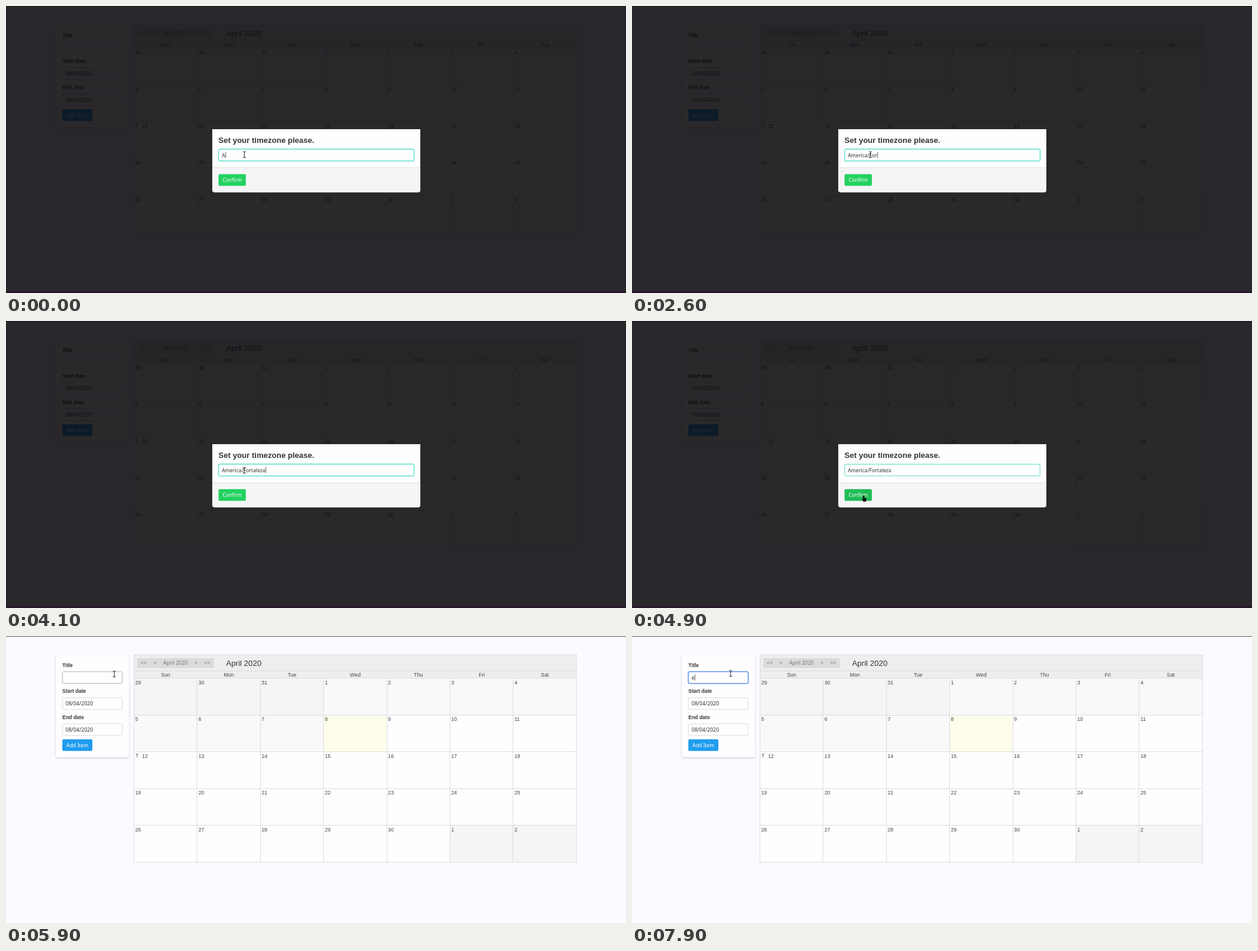
Animation of 1034 by 480 pixels, one loop 8000 ms. Source, as an HTML page with a canvas:

```html
<!DOCTYPE html>
<html lang="en">
<head>
<meta charset="utf-8">
<title>Calendar with timezone prompt</title>
<style>
html, body { margin: 0; width: 100%; height: 100%; overflow: hidden; background: #f9fbff; }
canvas { display: block; }
</style>
</head>
<body>
<canvas id="stage" width="1034" height="480"></canvas>
<script>
const ctx = document.getElementById('stage').getContext('2d');
const LOOP = 8000;
const SANS = '"Liberation Sans", Arial, sans-serif';
const UI = '"Noto Sans", "Open Sans", sans-serif';
const INK = '#363636';

const zone = 'America/Fortaleza';
const keyTimes = [0, 300, 500, 600, 800, 900, 1000, 1800, 2200, 2400, 2600,
  2800, 2900, 3100, 3200, 3500, 3700];
const CLICK = 4800, CLOSE = 5000, FOCUS = 6600, TITLE_KEY = 7800;

// time, x, y
const mousePath = [
  [0, 397.5, 248.5], [4000, 397.5, 248.5], [4100, 397.5, 249.5], [4200, 396, 259],
  [4400, 388, 287], [4500, 384.5, 293], [5000, 384.3, 292.7], [5100, 383, 291],
  [5400, 366, 270], [5600, 334, 230], [5700, 285, 170], [5800, 218, 82],
  [5900, 180.5, 63.5], [6100, 171, 61], [6400, 164.5, 62.5], [LOOP, 164.5, 62.5]
];

function mouseAt(t) {
  const i = mousePath.findIndex(p => p[0] > t);
  const [t0, x0, y0] = mousePath[i - 1], [t1, x1, y1] = mousePath[i];
  const k = (t - t0) / (t1 - t0);
  return { x: x0 + (x1 - x0) * k, y: y0 + (y1 - y0) * k };
}

const inside = (m, x, y, w, h) => m.x >= x && m.x <= x + w && m.y >= y && m.y <= y + h;
const caretOn = age => age % 1200 < 600;

function box(x, y, w, h, fill, radius = 0, stroke, lineWidth = 1) {
  ctx.beginPath();
  ctx.roundRect(x, y, w, h, radius);
  if (fill) { ctx.fillStyle = fill; ctx.fill(); }
  if (stroke) { ctx.strokeStyle = stroke; ctx.lineWidth = lineWidth; ctx.stroke(); }
}

// y is the middle of the capitals; returns the text width
function text(str, x, y, font = SANS, size = 8.67, color = INK, align = 'left', weight = 400) {
  ctx.font = `${weight} ${size}px ${font}`;
  ctx.fillStyle = color;
  ctx.textAlign = align;
  ctx.fillText(str, x, y + size * 0.36);
  return ctx.measureText(str).width;
}

function field(x, y, w, value, border, ring, caret, size = 8.67) {
  if (ring) box(x, y, w, 19.5, null, 2.5, ring, 2.6);
  box(x, y, w, 19.5, '#fffeff', 2.5, border);
  const width = text(value, x + 5.2, y + 10, UI, size);
  if (caret) box(x + 5.7 + width, y + 4.7, 0.8, 10, INK);
}

function button(x, y, w, label, color) {
  box(x, y, w, 19.5, color, 2);
  text(label, x + w / 2, y + 10, UI, 8.43, '#fff', 'center');
}

function drawForm(t, mouse) {
  ctx.save();
  ctx.shadowColor = 'rgba(10,10,10,.22)';
  ctx.shadowBlur = 3;
  ctx.shadowOffsetY = 1;
  box(83, 31.5, 122, 171.5, '#fffdff', 4);
  ctx.restore();
  ['Title', 'Start date', 'End date'].forEach((label, i) =>
    text(label, 94, 48.5 + 43.5 * i, SANS, 8.5, INK, 'left', 700));

  const focused = t >= FOCUS;
  const typed = t >= TITLE_KEY;
  const hover = t > CLOSE && inside(mouse, 94, 59, 100, 21);
  field(94, 59.8, 99.8, typed ? 'e' : '', focused ? '#3273dc' : hover ? '#b0acac' : '#dbd9dc',
    focused && 'rgba(50,115,220,.3)', focused && caretOn(t - (typed ? TITLE_KEY : FOCUS)));
  for (const y of [103.3, 146.8]) field(94, y, 99.8, '08/04/2020', '#dbd9dc');
  button(94, 172.7, 50, 'Add Item', '#209cee');
}

function drawCalendar() {
  const left = 213.5, top = 71, cw = 105.4, rh = 61.5;
  box(left, 31.5, cw * 7, 39.5, '#eeedef');
  box(219, 37, 127.5, 16.5, '#dcdadc');
  [['<<', 229.5], ['<', 248.5], ['April 2020', 282.5], ['>', 317], ['>>', 335.5]].forEach(([s, x]) =>
    text(s, x, 45, UI, 8.6, '#757475', 'center'));
  text('April 2020', 367, 45, SANS, 13.1);
  ['Sun', 'Mon', 'Tue', 'Wed', 'Thu', 'Fri', 'Sat'].forEach((day, i) =>
    text(day, left + cw * (i + 0.5), 64.5, SANS, 8.67, '#454446', 'center'));

  for (let i = 0; i < 35; i++) {
    const day = i - 2;
    const x = left + cw * (i % 7), y = top + rh * Math.floor(i / 7);
    const color = day < 1 || day > 30 ? '#f6f5f5' : day < 8 ? '#f9f9fb' : day === 8 ? '#fefdec' : '#fffdff';
    box(x, y, cw, rh, color);
    const label = day < 1 ? 31 + day : day > 30 ? day - 30 : day;
    if (day === 12) text('†', x + 3, y + 6.2, UI, 8.67);
    text(label, x + (day === 12 ? 13.4 : 2), y + 6.5, SANS, 8.67, '#454446');
  }

  ctx.fillStyle = '#dddcde';
  for (let c = 0; c <= 7; c++) {
    const y = c % 7 ? top : 31;
    ctx.fillRect(Math.floor(left + cw * c), y, 1, 379 - y);
  }
  for (const y of [31, 58]) ctx.fillRect(213, y, 739, 1);
  for (let r = 0; r <= 5; r++) ctx.fillRect(213, Math.floor(top + rh * r - 0.5), 739, 1);
}

function drawModal(t, mouse) {
  box(0, 0, 1034, 480, 'rgba(10,8,11,.865)');
  box(0, 477, 1034, 3, '#29172a');
  box(344, 206, 347, 105.5, '#fffeff', [0, 0, 4, 4]);
  box(344, 270, 347, 41.5, '#f5f4f6', [0, 0, 4, 4]);
  box(344, 270, 347, 0.8, '#dbdbdb');
  text('Set your timezone please.', 354.3, 224.5, SANS, 13.03, INK, 'left', 700);

  const count = keyTimes.filter(k => k <= t).length;
  const focused = t < CLICK;
  field(354.7, 239.5, 325.7, zone.slice(0, count), focused ? '#42dcc4' : '#5cd6c5',
    focused && 'rgba(0,209,178,.3)', focused && caretOn(t - keyTimes[count - 1]), 8.5);
  const hover = inside(mouse, 354, 281, 46, 20);
  button(354.4, 281.2, 45.6, 'Confirm', hover ? (focused ? '#22c65b' : '#20bc56') : '#23d160');
}

function shape(path, x, y, fill, stroke, lineWidth) {
  ctx.save();
  ctx.translate(x, y);
  const p = new Path2D(path);
  ctx.lineWidth = lineWidth;
  ctx.strokeStyle = stroke;
  ctx.lineJoin = 'round';
  if (fill) { ctx.fillStyle = fill; ctx.fill(p); }
  ctx.stroke(p);
  ctx.restore();
}

function drawMouse(t, m) {
  const open = t < CLOSE;
  const onField = open ? inside(m, 354, 239, 327, 20.5) : inside(m, 94, 59, 100, 21);
  if (onField) {
    shape('M-2.5-5Q0-5 0-4Q0-5 2.5-5M0-4V4M-2.5 5Q0 5 0 4Q0 5 2.5 5', m.x, m.y, null, '#3f3d40', 1.1);
  } else if (open && inside(m, 354, 281, 46, 20)) {
    shape('M1 0Q2-.8 2.8 0V3L6 4Q6.5 4.5 6.3 6L5.6 9H1.6L-.6 5.6Q0 4.6 1 5.6Z', m.x, m.y, '#111', '#111', 0.7);
  } else {
    shape('M0 0V9.8L2.1 7.9L3.6 11.2L5.2 10.5L3.8 7.3H6.4Z', m.x + 0.3, m.y + 0.3, '#fff', '#222', 1);
  }
}

function render(now) {
  const t = Math.floor(now % LOOP / 100) * 100;
  const mouse = mouseAt(t);
  box(0, 0, 1034, 480, '#f9fbff');
  box(0, 0, 1034, 1, '#5c5a5e');
  drawForm(t, mouse);
  drawCalendar();
  if (t < CLOSE) drawModal(t, mouse);
  drawMouse(t, mouse);
}

let start;
function tick(now) {
  start ??= now;
  render(now - start);
  requestAnimationFrame(tick);
}
render(0);
requestAnimationFrame(tick);
</script>
</body>
</html>
```
